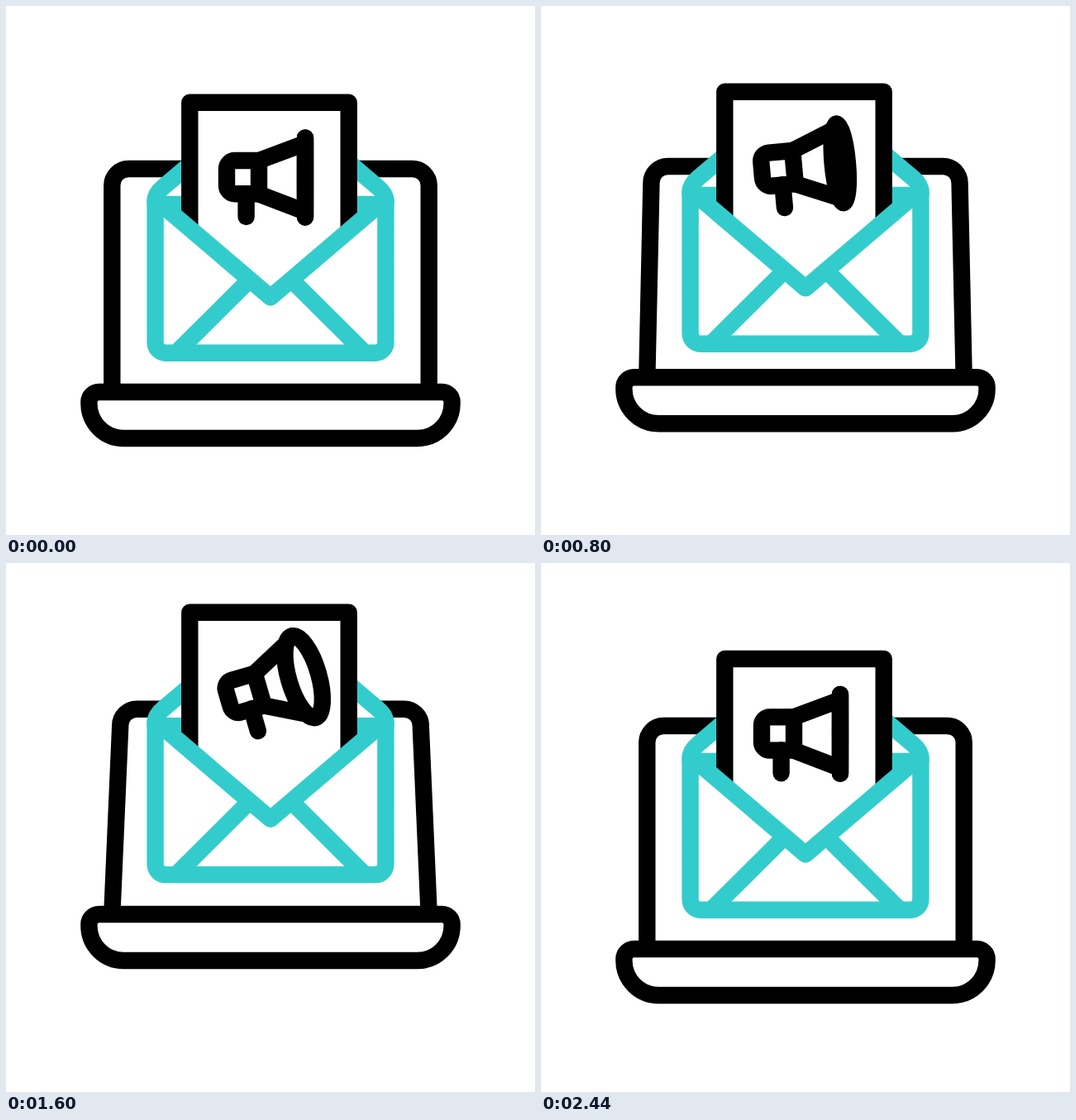
An HTML page that plays this animation: 640x640 px, repeating every 2.8 s.

```html
<!DOCTYPE html>
<html lang="en">
<head>
<meta charset="utf-8">
<title>Mail campaign</title>
<style>
  html, body { margin: 0; width: 100%; height: 100%; overflow: hidden; background: #fff; }
  svg { display: block; width: 100%; height: 100%; }
  .ink, .teal { fill: none; stroke: #000; stroke-width: 20.4; stroke-linejoin: round; }
  .teal { stroke: #33cccc; }
  .round { stroke-linecap: round; }
  .white { fill: #fff; }
</style>
</head>
<body>
<svg viewBox="0 0 640 640">
  <path id="lid" class="ink white"/>
  <path id="base" class="ink white" d="M112.4 467H527.6a12 12 0 0 1 12 12v2a42 42 0 0 1 -42 42H142.4a42 42 0 0 1 -42 -42v-2a12 12 0 0 1 12 -12Z"/>
  <path id="back" class="teal white" d="M225 189.6L190 219.3Q180.6 227 180.6 236V240H459.4V236Q459.4 227 450 219.3L415 189.6"/>
  <g id="paper">
    <path class="ink white" d="M222.3 330V116.7H414.7V330"/>
    <g id="horn">
      <path class="ink" d="M306 187H277a10 10 0 0 0 -10 10V217.3a10 10 0 0 0 10 10H306Z"/>
      <path class="ink round" d="M290.6 227V255"/>
      <path id="cone" class="ink"/>
      <path id="mouth" class="ink white"/>
      <path id="tips" class="ink round"/>
    </g>
  </g>
  <g id="front">
    <path class="teal white" d="M320 352.5L180.6 233.7V407.3a12.5 12.5 0 0 0 12.5 12.5H446.9a12.5 12.5 0 0 0 12.5 -12.5V233.7Z"/>
    <path class="teal round" d="M288 338L206 419.6M352 338L434 419.6"/>
  </g>
</svg>
<script>
const LOOP = 2800;
const LAG = 60;    // delay from one layer to the next
const SWING = 260; // length of each late swing
const el = id => document.getElementById(id);

const smooth = u => u * u * (3 - 2 * u);

// Every layer dips, glides up with a long ease-out, drops, rebounds and settles.
// A higher depth makes the layer follow later and glide more sharply.
function move(depth, dip, top, drop, rebound) {
  const values = [0, dip, top, drop, rebound, 0];
  const times = [200, 400, 1570, 1570 + SWING, 1570 + 2 * SWING, 1570 + 3 * SWING];
  const glide = u => 1 - (1 - u) ** (2.5 + 0.15 * depth);
  return t => {
    t -= depth * LAG;
    const i = times.findIndex(end => t < end);
    if (i < 1) return 0;
    const u = (t - times[i - 1]) / (times[i] - times[i - 1]);
    const ease = i === 2 ? glide : smooth;
    return values[i - 1] + (values[i] - values[i - 1]) * ease(u);
  };
}

const baseY = move(0, 33, -45, 33, -18);
const lidRise = move(0, 0, 22.5, 0.5, 1);
const lidInset = move(0, -5, 10.6, -6, 4);
const mailY = move(1, 36, -42.7, 32, -24);
const tilt = move(1, 11.6, -16.3, 5.4, -1.2);
const flare = move(1, -4.5, 18.3, 2.6, -0.6);
const paperY = move(2, 38, -57, 28, -19);

const shift = (id, y) => el(id).setAttribute("transform", `translate(0 ${y})`);
const shape = (id, d) => el(id).setAttribute("d", d);

function drawLid(t) {
  const by = baseY(t), y = 197 + by + lidRise(t), inset = lidInset(t);
  const l = 128.3 + inset, r = 511.7 - inset;
  shape("lid", `M128.3 ${467 + by}L${l} ${y + 20}A20 20 0 0 1 ${l + 20} ${y}` +
    `H${r - 20}A20 20 0 0 1 ${r} ${y + 20}L511.7 ${467 + by}`);
}

function drawHorn(t) {
  const cx = 362, cy = 207.5;
  const rx = Math.max(flare(t), 0.1);
  const ry = 48 + 0.18 * rx * Math.cos(2 * Math.PI * (t - 1600) / 1080);
  const spread = ry * 0.862, x = cx - rx * 0.5;
  const top = cy - ry, bottom = cy + ry;
  shape("cone", `M306 187L${x} ${cy - spread}M306 227.5L${x} ${cy + spread}`);
  shape("mouth", `M${cx} ${top}A${rx} ${ry} 0 0 1 ${cx} ${bottom}A${rx} ${ry} 0 0 1 ${cx} ${top}Z`);
  shape("tips", rx < 1 ? `M${cx} ${top}V${bottom}` : `M${cx} ${top}v.01M${cx} ${bottom}v.01`);
  el("horn").setAttribute("transform", `rotate(${tilt(t)} 316 207.5)`);
}

function draw(t) {
  drawLid(t);
  drawHorn(t);
  shift("base", baseY(t));
  shift("back", mailY(t));
  shift("front", mailY(t));
  shift("paper", paperY(t));
}

const start = performance.now();
function tick(now) {
  draw(Math.max(0, now - start) % LOOP);
  requestAnimationFrame(tick);
}
draw(0);
requestAnimationFrame(tick);
</script>
</body>
</html>
```
